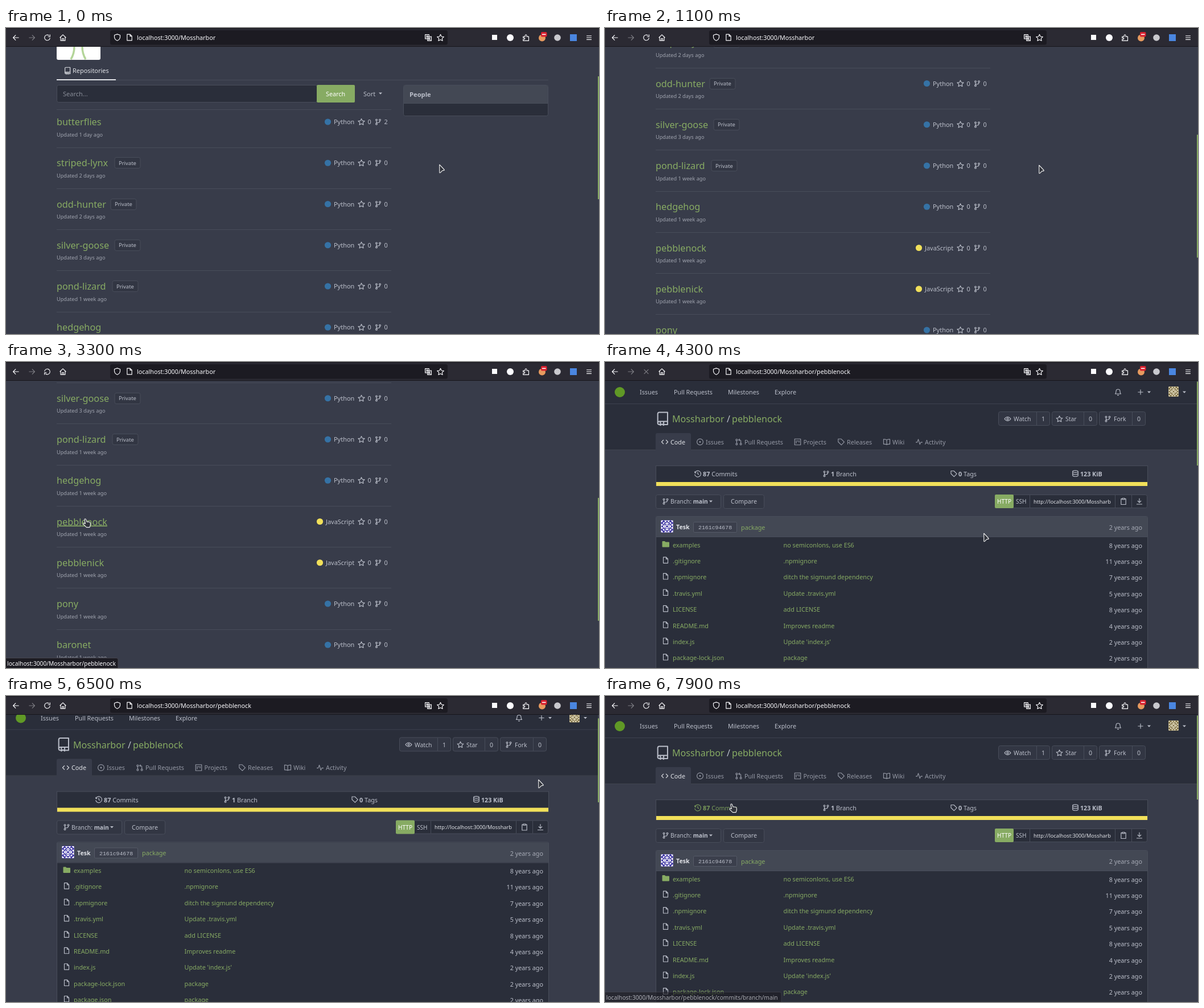
Write an HTML page that moves like this. It is 1042 px wide and 538 px high and loops after 8000 ms.

```html
<!DOCTYPE html>
<html lang="en">
<head>
<meta charset="utf-8">
<title>Repository browser</title>
<style>
  html, body { margin: 0; width: 100%; height: 100%; overflow: hidden; background: #383c4a; }
  svg { display: block; width: 1042px; height: 538px; font-family: "Noto Sans", sans-serif; }
  text { white-space: pre; }
  .m { font-family: "Liberation Mono", monospace; }
</style>
</head>
<body>
<svg id="stage" viewBox="0 0 1042 538" xmlns="http://www.w3.org/2000/svg"></svg>
<script>
const C = {
  body: '#383c4a', dark: '#2a2e3a', head: '#434854', button: '#323643', line: '#484d5a', green: '#87ab63',
  text: '#bbbfca', dim: '#9599a5', bright: '#dfe1e6', bar: '#2b2a33', chrome: '#fbfbfe',
  python: '#3572a5', js: '#f1e05a'
};
const ORG = 'Mossharbor', REPO = 'pebblenock', HOST = 'localhost:3000/';

// Line icons on a 12 x 12 grid
const ICONS = {
  repo: 'M2 10V2Q2 .7 3.3.7H10.3V8.4H3.4Q2 8.4 2 9.7T3.4 11H4M7.5 11H10.3V8.4M4.2 8.6V11.6L5.6 10.6 7 11.6V8.6',
  star: 'M6 .8 7.6 4.2 11.4 4.7 8.6 7.3 9.3 11 6 9.2 2.7 11 3.4 7.3.6 4.7 4.4 4.2Z',
  fork: 'M3 4V8.5M3 7.2H6.5Q9 7 9 4.2M1.6 2.6a1.4 1.4 0 1 0 2.8 0a1.4 1.4 0 1 0-2.8 0M7.6 2.6a1.4 1.4 0 1 0 2.8 0a1.4 1.4 0 1 0-2.8 0M1.6 9.8a1.4 1.4 0 1 0 2.8 0a1.4 1.4 0 1 0-2.8 0',
  pull: 'M2.5 4V8.2M9.5 8.2V4.5Q9.5 2.6 7.5 2.6H6M7.6.8 5.8 2.6 7.6 4.4M1.1 2.6a1.4 1.4 0 1 0 2.8 0a1.4 1.4 0 1 0-2.8 0M1.1 9.7a1.4 1.4 0 1 0 2.8 0a1.4 1.4 0 1 0-2.8 0M8.1 9.7a1.4 1.4 0 1 0 2.8 0a1.4 1.4 0 1 0-2.8 0',
  code: 'M4 2.6.7 6 4 9.4M8 2.6 11.3 6 8 9.4',
  issue: 'M.8 6a5.2 5.2 0 1 0 10.4 0a5.2 5.2 0 1 0-10.4 0M5.2 6a.8.8 0 1 0 1.6 0a.8.8 0 1 0-1.6 0',
  board: 'M1 1H11V11H1ZM3.6 3.3V8.6M6 3.3V5.6M8.4 3.3V7',
  tag: 'M1 1H6L11.2 6.2 6.3 11.1 1 6ZM3.3 3.3H3.6',
  book: 'M6 2.8Q5 1.4.7 1.6V9.7Q5 9.5 6 10.8Q7 9.5 11.3 9.7V1.6Q7 1.4 6 2.8V10.6',
  pulse: 'M.3 6.6H2.8L4.6 1.6 7.2 10.2 8.8 6.6H11.7',
  eye: 'M.5 6Q6-1 11.5 6Q6 13 .5 6ZM4.4 6a1.6 1.6 0 1 0 3.2 0a1.6 1.6 0 1 0-3.2 0',
  clock: 'M1.1 2V4.4H3.5M1.2 4.2A5.2 5.2 0 1 1 .9 7M6 3.2V6.3L8 7.4',
  disk: 'M1.2 2.6a4.8 1.8 0 1 0 9.6 0a4.8 1.8 0 1 0-9.6 0V9.5Q1.6 11.2 6 11.2T10.8 9.5V2.6M1.2 6Q1.6 7.7 6 7.7T10.8 6',
  clip: 'M4 1.8H2V11.3H10V1.8H8M4 .7H8V2.8H4Z',
  load: 'M6 .8V8M2.9 5 6 8.1 9.1 5M1 11H11',
  file: 'M2 .8H7L10 3.8V11.2H2ZM7 .8V4H10',
  bell: 'M1.4 8.8Q2.8 7.4 2.8 4.6A3.2 3.2 0 0 1 9.2 4.6Q9.2 7.4 10.6 8.8ZM4.8 10.6Q6 11.8 7.2 10.6',
  plus: 'M6 1V11M1 6H11',
  back: 'M11.3 6H1M5.6 1.2.9 6 5.6 10.8',
  next: 'M.7 6H11M6.4 1.2 11.1 6 6.4 10.8',
  reload: 'M10.8 6.3A4.8 4.8 0 1 1 9 2.2M10.8.6V4.2H7.2',
  stop: 'M1.8 1.8 10.2 10.2M10.2 1.8 1.8 10.2',
  home: 'M.6 6 6 .9 11.4 6M2 5V11.1H10V5M4.7 11V7.5H7.3V11',
  shield: 'M6 .6 10.8 2.2V5.5Q10.6 9.6 6 11.5Q1.4 9.6 1.2 5.5V2.2Z',
  lang: 'M.8.8H7.2V7.8H.8ZM4.8 4.2H11.2V11.2H4.8ZM2.4 6 4 2.4 5.4 6M6.4 6.5H9.8M8 6.5Q8 9 6.3 9.8M7 7.8 9.8 9.8',
  puzzle: 'M1 4.2H4.2V2.6Q4.4 1 5.6 1T7 2.6V4.2H10.3V11.2H1V8.8H2.4Q3.8 8.6 3.8 7.6T2.4 6.4H1Z',
  menu: 'M1.2 2.4H10.8M1.2 6H10.8M1.2 9.6H10.8'
};

const rect = (x, y, w, h, fill, more = '') =>
  `<rect x="${x}" y="${y}" width="${w}" height="${h}" fill="${fill}" ${more}/>`;
const box = (x, y, w, h, fill, r = 3, edge = C.line) =>
  rect(x + .5, y + .5, w - 1, h - 1, fill, `rx="${r}" stroke="${edge}"`);
const text = (x, y, s, size = 10.8, fill = C.text, more = '') =>
  `<text x="${x}" y="${y}" font-size="${size}" fill="${fill}" ${more}>${s}</text>`;
const disc = (x, y, r, fill) => `<circle cx="${x}" cy="${y}" r="${r}" fill="${fill}"/>`;
const path = (d, fill, more = '') => `<path d="${d}" fill="${fill}" ${more}/>`;
const icon = (name, cx, cy, size = 12, color = C.text, more = '') => {
  const k = size / 12, w = Math.max(1.15, size / 12.5) / k;
  return `<g transform="translate(${cx - size / 2} ${cy - size / 2}) scale(${k})" ${more}>` +
    path(ICONS[name], 'none', `stroke="${color}" stroke-width="${w}" stroke-linejoin="round"`) + '</g>';
};
const caret = (x, y, color = C.text) => path(`M${x - 3} ${y - 1.5}h6l-3 3.2z`, color);
const bold = s => `<tspan font-weight="600">${s}</tspan>`;
const MED = 'font-weight="500"', BOLD = 'font-weight="600"', END = 'text-anchor="end"', MID = 'text-anchor="middle"';

// Four-fold symmetric avatar
function avatar(x, y, s, bg, fg) {
  const arm = path('M0-10H-5L-2.5-6.5ZM0-10H5L2.5-6.5ZM-10-10H-6L-10-6ZM-4-4H4L0-7Z', fg) +
    path('M-7-7H-3L-7-3Z', fg);
  const arms = [0, 90, 180, 270].map(a => `<g transform="rotate(${a})">${arm}</g>`).join('');
  return rect(x, y, s, s, bg, 'rx="1.5"') +
    `<g transform="translate(${x + s / 2} ${y + s / 2}) scale(${s / 21})">${arms}` +
    `<circle r="2.6" fill="none" stroke="${fg}" stroke-width="1.6"/></g>`;
}

function orgPage() {
  const repos = [
    ['butterflies', '1 day', 0, 2], ['striped-lynx', '2 days', 191], ['odd-hunter', '2 days', 184],
    ['silver-goose', '3 days', 191], ['pond-lizard', '1 week', 187], ['hedgehog', '1 week'],
    [REPO, '1 week'], ['pebblenick', '1 week'], ['pony', '1 week'], ['baronet', '1 week']
  ];
  let s = rect(89, 0, 77, 56, '#fff', 'rx="3"') +
    path('M120 33Q120 45 114 55M134 33Q134 45 140 55', 'none', 'stroke="#b4d59a" stroke-width="3.5"') +
    rect(89, 91, 864, 1, C.line) + rect(89, 90, 104, 2, C.bright) +
    icon('repo', 108, 75, 13, C.bright) + text(117, 79, 'Repositories', 10.95, C.bright) +
    box(89, 100, 458, 31, C.dark) + text(100, 120, 'Search...', 11, '#8a8e99') +
    rect(546, 100, 67, 31, C.green, 'rx="2"') + text(562, 119.5, 'Search', 10.75, '#fff') +
    text(628, 120, 'Sort', 11) + caret(658, 115) +
    box(698, 100, 255, 55, C.dark) + rect(699, 101, 253, 31, C.head) + rect(699, 132, 253, 1, C.line) +
    text(709, 121, 'People', 11.2, C.text, BOLD) + rect(89, 143, 588, 1, C.line);
  repos.forEach(([name, age, tag, forks = 0], i) => {
    const y = 165 + 72.25 * i, js = i === 6 || i === 7, dot = js ? 551.5 : 565.5;
    s += text(89, y + 6, name, 16.25, C.green, MED + (i === 6 ? ' id="link"' : '')) +
      text(89, y + 25.5, `Updated ${age} ago`, 9.15, '#a0a4af') +
      disc(dot, y, 5.6, js ? C.js : C.python) +
      text(dot + 10.5, y + 4, js ? 'JavaScript' : 'Python', 10.95, C.text, MED) +
      icon('star', 624.5, y, 12.5) + text(635.5, y + 4, 0, 10.95, C.text, MED) +
      icon('fork', 654, y, 12) + text(664.5, y + 4, forks, 10.95, C.text, MED) +
      rect(89, Math.round(y + 44.5), 588, 1, C.line);
    if (tag) s += box(tag - .5, Math.round(y) - 10, 46, 20, C.button) + text(tag + 7, y + 3.5, 'Private', 9.45);
  });
  return s;
}

function repoPage() {
  const files = [
    ['examples', 'no semiconlons, use ES6', 8], ['.gitignore', '.npmignore', 11],
    ['.npmignore', 'ditch the sigmund dependency', 7], ['.travis.yml', 'Update .travis.yml', 5],
    ['LICENSE', 'add LICENSE', 8], ['README.md', 'Improves readme', 4],
    ['index.js', "Update 'index.js'", 2], ['package-lock.json', 'package', 2], ['package.json', 'package', 2],
    ['test.js', 'add missing use strict, add text with complex objects and dates', 7]
  ];
  const tabs = [['code', 105, 'Code'], ['issue', 167, 'Issues'], ['pull', 235, 'Pull Requests'],
    ['board', 338.5, 'Projects'], ['tag', 415, 'Releases'], ['book', 495, 'Wiki'], ['pulse', 552, 'Activity']];
  const counts = [['eye', 691, 91, 758, 'Watch', 718, 1], ['star', 785, 80, 841, 'Star', 809, 0],
    ['fork', 868, 82, 926, 'Fork', 894, 0]];

  let s = rect(0, 33, 1040, 122, C.dark) + rect(0, 73, 1040, 1, '#3d414e') + rect(0, 154, 1040, 1, '#41454f') +
    disc(26, 53, 9, '#609926');
  [[61, 'Issues'], [121, 'Pull Requests'], [216, 'Milestones'], [298, 'Explore']]
    .forEach(([x, t]) => s += text(x, 57, t));
  s += icon('bell', 901.5, 53, 13) + icon('plus', 941, 53, 11) + caret(956, 53) +
    avatar(990, 43, 18, '#7d6d40', '#e6dfc4') + caret(1018, 53) +
    icon('repo', 101, 99.5, 25) + text(118, 106, ORG, 16.1, C.green) + text(214, 106, '/', 16.1) +
    text(223, 106, REPO, 16.1, C.green);
  counts.forEach(([ic, x, w, mid, label, lx, n]) => {
    s += box(x, 87, w, 25, C.button) + rect(mid, 88, 1, 23, C.line) + icon(ic, lx - 10.5, 100) +
      text(lx, 104, label, 10.4) + text((mid + x + w) / 2, 104, n, 10.6, C.text, MID);
  });
  s += path('M89 156V128Q89 125 92 125H148Q151 125 151 128V156Z', C.body);
  tabs.forEach(([ic, x, label], i) => {
    const c = i ? C.dim : C.bright;
    s += icon(ic, x, 140.5, 12.5, c) + text(x + 10, 144.5, label, 10.8, c);
  });

  s += box(89, 182, 865, 36, C.dark, 0) + rect(90, 211, 863, 7, C.js) +
    `<g id="commits">${icon('clock', 163, 196.5, 12.5, 'currentColor')}` +
    text(172, 201, bold('87') + ' Commits', 10.8, 'currentColor') + '</g>' +
    icon('fork', 388.5, 196.5) + text(397, 201, bold('1') + ' Branch') +
    icon('tag', 613, 196.5) + text(621, 201, bold('0') + ' Tags') +
    icon('disk', 826.5, 196) + text(835, 201, '123 KiB', 10.7, C.text, BOLD) +
    box(89, 233, 115, 25, C.button) + icon('fork', 106.5, 245) +
    text(115, 249, 'Branch: ' + bold('main'), 10.3) + caret(186, 245) +
    box(208, 233, 72, 25, C.button) + text(221, 249, 'Compare', 10.7) +
    box(685, 233, 268, 24, C.dark) + rect(685, 233, 33, 24, C.green, 'rx="2"') +
    text(689, 249, 'HTTP', 10.15, '#fff') + text(722, 249, 'SSH', 10.15) + rect(746, 234, 1, 22, C.line) +
    text(753, 248.5, 'http://' + HOST + 'Mossharb', 9.2, C.bright) + rect(896, 234, 1, 22, C.line) +
    icon('clip', 911, 245, 12.5) + rect(925, 234, 1, 22, C.line) + icon('load', 939, 245);

  s += box(89, 271, 865, 320, C.dark, 2) + rect(90, 272, 863, 35, C.head) + rect(90, 307, 863, 1, C.line) +
    avatar(98, 278, 22, '#3b32a3', '#fff') + text(125, 294, 'Tesk', 10.6, C.bright, BOLD) +
    box(155, 281, 77, 19, '#3b3f4c', 2, '#555a67') + text(164, 294, '2161c94678', 9.85, C.text, 'class="m"') +
    text(239, 294.5, 'package', 10.8, C.green) + text(944, 295, '2 years ago', 10.8, '#a6aab5', END);
  files.forEach(([name, note, age], i) => {
    const y = 321.5 + 28.4 * i;
    s += (i ? icon('file', 106.5, y - 1.5, 12)
      : path('M100.5 316q0-1 1-1h3.5l1.5 1.5h5.5q1 0 1 1v7q0 1-1 1h-10.5q-1 0-1-1z', C.green)) +
      text(119, y + 4, name, 10.8, C.green) + text(313.5, y + 4, note, 10.8, C.green) +
      text(944, y + 5, age + ' years ago', 10.8, C.text, END);
  });
  return s + box(89, 603, 865, 200, C.dark, 2) + rect(90, 604, 863, 28, C.head) + rect(90, 632, 863, 1, C.line) +
    icon('book', 104, 617.5, 12.5) + text(115, 622, 'README.md', 11.2, C.text, BOLD) +
    '<g id="tip">' + rect(843, 199, 110, 28, '#1b1d23', 'rx="3"') + path('M936 227h9l-4.5 4.5z', '#1b1d23') +
    text(852, 216, 'Download Repository', 9.15, C.bright) + '</g>';
}

function toolbar() {
  const w = C.chrome;
  return rect(0, 0, 1042, 33, C.bar) + rect(0, 0, 1042, 1.5, '#1c1b22') + rect(0, 32, 1042, 1, '#17161c') +
    icon('back', 17.5, 17, 11.5, w) + icon('next', 45.5, 17, 11.5, w, 'opacity=".4"') +
    icon('reload', 72.5, 17, 12, w, 'id="reload"') +
    `<g id="stop">${icon('stop', 72.5, 17, 11, w)}</g>` + icon('home', 100, 17, 12, w) +
    rect(183, 4, 593, 25.5, '#1c1b22', 'rx="3.5"') + icon('shield', 195.5, 16.5, 12.5, w) +
    icon('file', 217, 16.5, 12.5, w) + text(230, 20.5, '', 10.76, w, 'id="url"') +
    icon('lang', 742, 17, 12.5, w) + icon('star', 763.5, 17, 13, w) +
    rect(854, 12, 9, 9, w) + disc(886, 17, 6, w) + icon('puzzle', 914, 17, 12.5, w) +
    disc(942, 17.5, 6, '#e79a5f') + rect(940, 7, 10.5, 8.5, '#d8212f', 'rx="2"') + rect(942, 10.5, 6.5, 1.6, '#fff') +
    disc(969, 17, 5.8, '#c9c9ce') + rect(991, 11, 12, 12, '#4a86e0') + icon('menu', 1024.5, 17, 11, w);
}

const skin = 'stroke="#f2f2f2" stroke-width="1.1" stroke-linejoin="round"';
const stage = document.getElementById('stage');
stage.innerHTML = rect(0, 0, 1042, 538, C.body) +
  `<g id="org">${orgPage()}</g><g id="repo">${repoPage()}</g>` +
  rect(1040, 34, 2, 216, C.green, 'id="thumb"') + toolbar() +
  '<g id="status"><path id="panel" fill="#1c1b22" stroke="#45444d"/>' +
  text(2, 533.5, '', 10.23, C.chrome, 'id="hint"') + '</g>' +
  '<g id="cursor">' +
  path('M.7 1.2 9 10Q9.6 11.2 8.3 11.4L5.6 11.8 2.2 15.4Q.8 16.4.8 14.8Z', '#31343c', skin + ' id="arrow"') +
  path('M-1.3 2Q-.3-.2 1.3 1.5L2.9 5.9 7.6 6.3Q9.4 6.9 9.3 9V12L8 15.6H2.4L-2.9 10.3Q-3.6 8.5-1.4 8.5L.5 9.3Z',
    '#31343c', skin + ' id="hand"') + '</g>';
const el = {};
stage.querySelectorAll('[id]').forEach(n => el[n.id] = n);

// Rows of [time, value, ...], joined by straight lines
function track(rows, t) {
  const i = rows.findIndex(r => r[0] > t);
  if (i === 0) return rows[0].slice(1);
  if (i < 0) return rows[rows.length - 1].slice(1);
  const a = rows[i - 1], b = rows[i], k = (t - a[0]) / (b[0] - a[0]);
  return a.slice(1).map((v, j) => v + (b[j + 1] - v) * k);
}
const ORG_SCROLL = [[600, 0], [700, 22], [800, 80], [900, 142], [1000, 194], [1100, 212],
  [1200, 212], [1300, 250], [1400, 300], [1500, 318]];
const REPO_SCROLL = [[6400, 0], [6500, 14.5], [6600, 60], [6700, 94], [6800, 106],
  [7000, 106], [7100, 102], [7200, 42], [7300, 0]];
const POINTER = [[600, 761, 239], [1000, 762, 240], [1800, 762, 240], [1900, 761, 239], [2000, 761, 239],
  [2200, 650, 325], [2300, 500, 382], [2400, 350, 391], [2500, 230, 345], [2600, 165, 300],
  [2700, 141, 276], [2800, 141, 276], [2900, 139, 275], [3900, 139, 275], [4000, 190, 285],
  [4300, 665, 300], [4500, 810, 280], [4800, 870, 246], [5000, 905, 205], [5200, 923, 172],
  [5300, 923, 172], [5500, 912, 157], [5700, 912, 157], [5900, 928, 145], [6100, 935, 146],
  [7000, 935, 146], [7100, 928, 150], [7200, 850, 172], [7300, 720, 203], [7500, 420, 214],
  [7700, 250, 197], [7800, 226, 190], [7900, 222, 189]];
const STATUS = [[3000, 0], [3100, .4], [3300, 1], [3900, 1], [4000, .5], [4100, 0], [7800, 0], [7900, .6]];
const TIP = [[6700, 0], [6900, .6], [7000, 1], [7100, 1], [7200, 0]];

const show = (n, on) => n.setAttribute('display', on ? 'inline' : 'none');
const move = (n, x, y) => n.setAttribute('transform', `translate(${x} ${y})`);
const fade = (n, v) => n.setAttribute('opacity', v);

function draw(ms) {
  const t = Math.floor(ms / 100) * 100;          // the picture steps at 10 Hz
  const onRepo = t >= 3600, busy = t >= 3400 && t < 5000;
  const [up] = track(onRepo ? REPO_SCROLL : ORG_SCROLL, t);
  const hand = t >= 2700 && t < 4000 || t >= 7700;

  show(el.org, !onRepo);
  show(el.repo, onRepo);
  move(onRepo ? el.repo : el.org, 0, -up);
  el.thumb.setAttribute('y', onRepo ? 34.5 + up * .335 : 85 + up * .484);
  el.thumb.setAttribute('height', onRepo ? 147.5 : 216);
  el.link.setAttribute('text-decoration', t >= 2700 ? 'underline' : 'none');
  el.commits.setAttribute('color', t >= 7700 ? '#7a9c5a' : C.text);
  fade(el.tip, track(TIP, t)[0]);

  el.url.textContent = HOST + ORG + (onRepo ? '/' + REPO : '');
  show(el.reload, !busy);
  show(el.stop, busy);
  fade(el.stop, t < 4100 ? 1 : .4);
  const spin = t === 3300 ? 180 : 0;
  el.reload.firstChild.setAttribute('transform', `rotate(${spin} 6 6)`);

  const late = t > 5000;
  el.hint.textContent = HOST + ORG + '/' + REPO + (late ? '/commits/branch/main' : '');
  el.panel.setAttribute('d', `M-1 520.5H${late ? 307 : 194}q3 0 3 3V539H-1Z`);
  fade(el.status, track(STATUS, t)[0]);

  move(el.cursor, ...track(POINTER, t));
  show(el.hand, hand);
  show(el.arrow, !hand);
}

const start = performance.now();
function tick() {
  draw((performance.now() - start) % 8000);
  requestAnimationFrame(tick);
}
tick();
</script>
</body>
</html>
```
